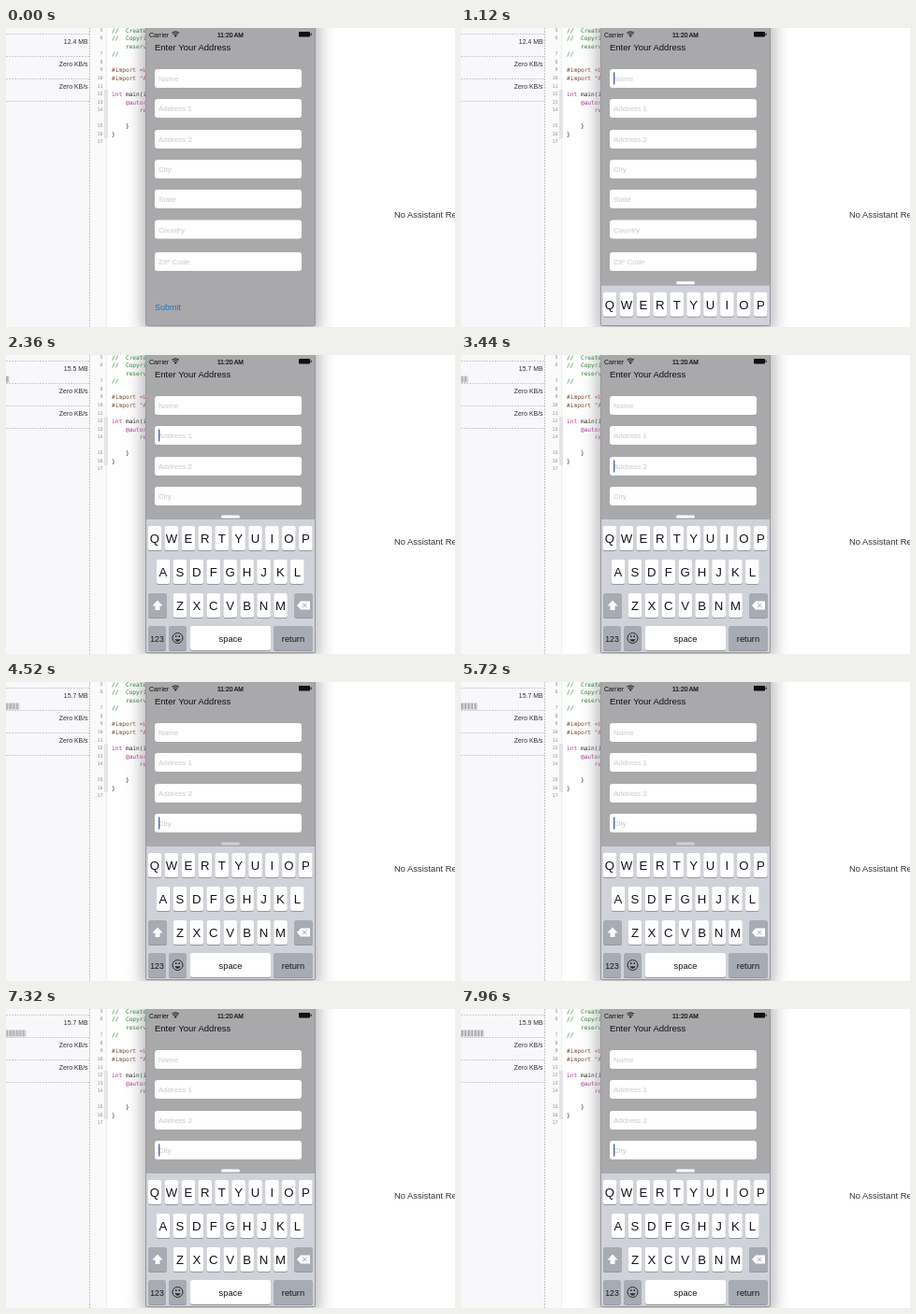
Recreate the animation shown at these times as an HTML page. Size 480 by 320 pixels, loop 8 s.

```html
<!DOCTYPE html>
<html lang="en">
<head>
<meta charset="utf-8">
<title>Address form</title>
<style>
  html, body { margin: 0; width: 100%; height: 100%; overflow: hidden; background: #fff; }
  svg { display: block; width: 100vw; height: 100vh; }
  text { font-family: "Liberation Sans", Arial, sans-serif; dominant-baseline: central; white-space: pre; }
  .code text { font: 6.2px "DejaVu Sans Mono", monospace; }
  .mid { text-anchor: middle; }
  .end { text-anchor: end; }

  #keyboard { animation: slide 8s infinite; }
  @keyframes slide {
    0%, 13.6% { transform: translateY(150px); animation-timing-function: cubic-bezier(.165, .84, .44, 1); }
    18.6%, 100% { transform: none; }
  }

  .grabber { fill: #fff; animation: dim 8s step-end infinite; }
  @keyframes dim {
    0% { fill: #fff; }
    46.5% { fill: #cfd0d4; }
    81%, 100% { fill: #fff; }
  }

  /* The caret moves down the form one field at a time. */
  #caret { animation: focus 8s step-end infinite; }
  @keyframes focus {
    0% { transform: translateY(54px); visibility: hidden; }
    13.5% { transform: translateY(54px); visibility: visible; }
    24.5% { transform: translateY(86px); visibility: visible; }
    35.5% { transform: translateY(119px); visibility: visible; }
    46.5%, 100% { transform: translateY(151px); visibility: visible; }
  }
  /* Seven blinks fill one loop. */
  #caret rect { animation: blink calc(8s / 7) infinite; }
  @keyframes blink {
    0%, 50% { opacity: 1; }
    58%, 82% { opacity: 0; }
    90%, 100% { opacity: 1; }
  }

  #history { animation: grow 8s step-end infinite; }
  @keyframes grow {
    0% { transform: translateX(-30px); }
    18.5% { transform: translateX(-21px); }
    31% { transform: translateX(-17.5px); }
    43.5% { transform: translateX(-14px); }
    56% { transform: translateX(-10.5px); }
    68.5% { transform: translateX(-7px); }
    81% { transform: translateX(-3.5px); }
    93.5%, 100% { transform: none; }
  }

  .memory { visibility: hidden; animation: 8s step-end infinite; }
  .memory:nth-of-type(1) { animation-name: first; }
  .memory:nth-of-type(2) { animation-name: second; }
  .memory:nth-of-type(3) { animation-name: third; }
  .memory:nth-of-type(4) { animation-name: fourth; }
  @keyframes first { 0% { visibility: visible; } 18.5%, 100% { visibility: hidden; } }
  @keyframes second { 0% { visibility: hidden; } 18.5% { visibility: visible; } 31%, 100% { visibility: hidden; } }
  @keyframes third { 0% { visibility: hidden; } 31% { visibility: visible; } 93.5%, 100% { visibility: hidden; } }
  @keyframes fourth { 0% { visibility: hidden; } 93.5%, 100% { visibility: visible; } }
</style>
</head>
<body>
<svg viewBox="0 0 480 320" preserveAspectRatio="none">
  <defs>
    <filter id="soft" x="-30%" y="-20%" width="160%" height="140%"><feGaussianBlur stdDeviation="9"/></filter>
    <clipPath id="screen"><rect x="150" width="180" height="318"/></clipPath>
    <pattern id="stripes" width="3.5" height="8" patternUnits="userSpaceOnUse"><rect width="2.7" height="8" fill="#b2b2b4"/></pattern>
  </defs>

  <rect width="480" height="320" fill="#fff"/>
  <rect width="90" height="320" fill="#f8f8fa"/>
  <rect x="90" width="18" height="320" fill="#fafafb"/>
  <path d="M89.5 0V320" stroke="#c4c4cc" stroke-dasharray="2 1"/>
  <path d="M0 6.5H89M0 30.5H89M0 54.5H89M0 78.5H89" stroke="#ccccd0" stroke-dasharray="2 1"/>
  <path d="M107.5 0V320" stroke="#eeeef0"/>
  <rect x="105" y="66" width="4" height="52" fill="#e4e4e8"/>

  <g fill="#303034" font-size="6.9">
    <g id="memory"></g>
    <text class="end" x="87.5" y="38">Zero KB/s</text>
    <text class="end" x="87.5" y="62">Zero KB/s</text>
  </g>
  <rect id="history" x="0" y="22.5" width="24.5" height="7" fill="url(#stripes)"/>
  <g id="code" class="code"></g>
  <text x="415" y="199.5" font-size="9.4" fill="#333336">No Assistant Results</text>

  <rect x="146" y="-20" width="188" height="348" rx="6" fill="#85858c" opacity=".65" filter="url(#soft)"/>
  <rect x="149" y="-5" width="182" height="324" rx="2" fill="#98989c"/>

  <g clip-path="url(#screen)">
    <rect x="150" width="180" height="320" fill="#a9a9ab"/>
    <g fill="#101012">
      <text x="153" y="7" font-size="6.9">Carrier</text>
      <text class="mid" x="240" y="7" font-size="6.7" stroke="#101012" stroke-width=".2">11:20 AM</text>
      <path d="M181.2 9.8 179.6 8Q181.2 6.8 182.8 8Z"/>
      <path d="M178.7 6.8Q181.2 4.9 183.7 6.8M177.4 5.2Q181.2 2.4 185 5.2" fill="none" stroke="#101012"/>
      <rect x="313" y="4" width="12" height="5.5" rx="1"/>
      <rect x="325.6" y="5.5" width="1" height="2.5"/>
      <text x="159" y="20.5" font-size="9.5">Enter Your Address</text>
    </g>
    <g id="form"></g>
    <text x="159" y="299" font-size="9" fill="#1577c8">Submit</text>
    <g id="caret"><rect x="163" y="-6.5" width="1.4" height="13" fill="#4a68a8"/></g>
    <g id="keyboard"></g>
  </g>
</svg>
<script>
  const SVG = "http://www.w3.org/2000/svg";
  const byId = id => document.getElementById(id);

  function add(parent, tag, attrs, content = "") {
    const node = document.createElementNS(SVG, tag);
    for (const name in attrs) node.setAttribute(name, attrs[name]);
    node.textContent = content;
    return parent.appendChild(node);
  }

  for (const value of ["12.4", "15.5", "15.7", "15.9"])
    add(byId("memory"), "text", { class: "end memory", x: 87.5, y: 14.5 }, value + " MB");

  // Line number (0 for a wrapped line), then coloured pieces of text.
  const green = "#258325", brown = "#774830", red = "#c33036", pink = "#b53098", dark = "#28282c";
  const lines = [
    [5, green, "//  Create"], [6, green, "//  Copyri"], [0, green, "    reserve"],
    [7, green, "//"], [8],
    [9, brown, "#import ", red, "<U"], [10, brown, "#import ", red, "\"A"], [11],
    [12, pink, "int", dark, " main(i"], [13, pink, "    @autor"], [14, pink, "        re"], [0],
    [15, dark, "    }"], [16, dark, "}"], [17]
  ];
  lines.forEach(([number, ...pieces], row) => {
    const y = 1.8 + row * 8.53;
    if (number) add(byId("code"), "text", { class: "end", x: 103.5, y, fill: "#909094", style: "font-size:5px" }, number);
    const line = add(byId("code"), "text", { x: 113, y });
    for (let i = 0; i < pieces.length; i += 2)
      add(line, "tspan", { fill: pieces[i] }, pieces[i + 1]);
  });

  const fieldRows = [54, 86, 119, 151, 183, 215.5, 250];
  ["Name", "Address 1", "Address 2", "City", "State", "Country", "ZIP Code"].forEach((label, i) => {
    const y = fieldRows[i];
    add(byId("form"), "rect", { x: 159, y: y - 10, width: 157, height: 20, rx: 3, fill: "#fff" });
    add(byId("form"), "text", { x: 163, y: y + .5, "font-size": 8, fill: "#c9c9d0" }, label);
  });

  const board = byId("keyboard");
  function key(x, y, width, label = "", size = 13.2, fill = "#fff") {
    add(board, "rect", { x, y: y - 12, width, height: 26, rx: 2.5, fill: "#96989f" });
    add(board, "rect", { x, y: y - 13, width, height: 26, rx: 2.5, fill });
    add(board, "text", { class: "mid", x: x + width / 2, y: y + .5, "font-size": size, fill: "#151518" }, label);
  }

  add(board, "rect", { x: 150, y: 170, width: 180, height: 7, fill: "#a8aab0" });
  add(board, "rect", { class: "grabber", x: 230, y: 171.5, width: 20, height: 3, rx: 1.5 });
  add(board, "rect", { x: 150, y: 176, width: 180, height: 150, fill: "#d0d2d9" });
  [["QWERTYUIOP", 159], ["ASDFGHJKL", 168], ["ZXCVBNM", 186]].forEach(([letters, start], row) =>
    [...letters].forEach((letter, i) => key(start + i * 17.92 - 7.3, 196 + row * 36, 14.6, letter)));

  const grey = "#a7abb3";
  key(152, 268, 20, "", 9, grey);
  key(308, 268, 20, "", 9, grey);
  key(152, 303, 19, "123", 8.7, grey);
  key(174, 303, 19, "", 9, grey);
  key(197, 303, 86, "space", 9.3);
  key(286, 303, 42, "return", 9.3, grey);

  add(board, "path", { d: "M162 262.5 167.5 268.5H164.5V273H159.5V268.5H156.5Z", fill: "#fff" });
  add(board, "path", { d: "M311 268 315 263.5H325V272.5H315Z", fill: "#fff" });
  add(board, "path", { d: "M317 265.8 321.5 270.2M321.5 265.8 317 270.2", stroke: grey });
  add(board, "circle", { cx: 183.5, cy: 303, r: 5.5, fill: "none", stroke: "#28282c" });
  add(board, "path", { d: "M180.3 304.2Q183.5 309.5 186.7 304.2Z M181 300.2h1.5v1.8h-1.5zM184.5 300.2h1.5v1.8h-1.5z", fill: "#28282c" });
</script>
</body>
</html>
```
